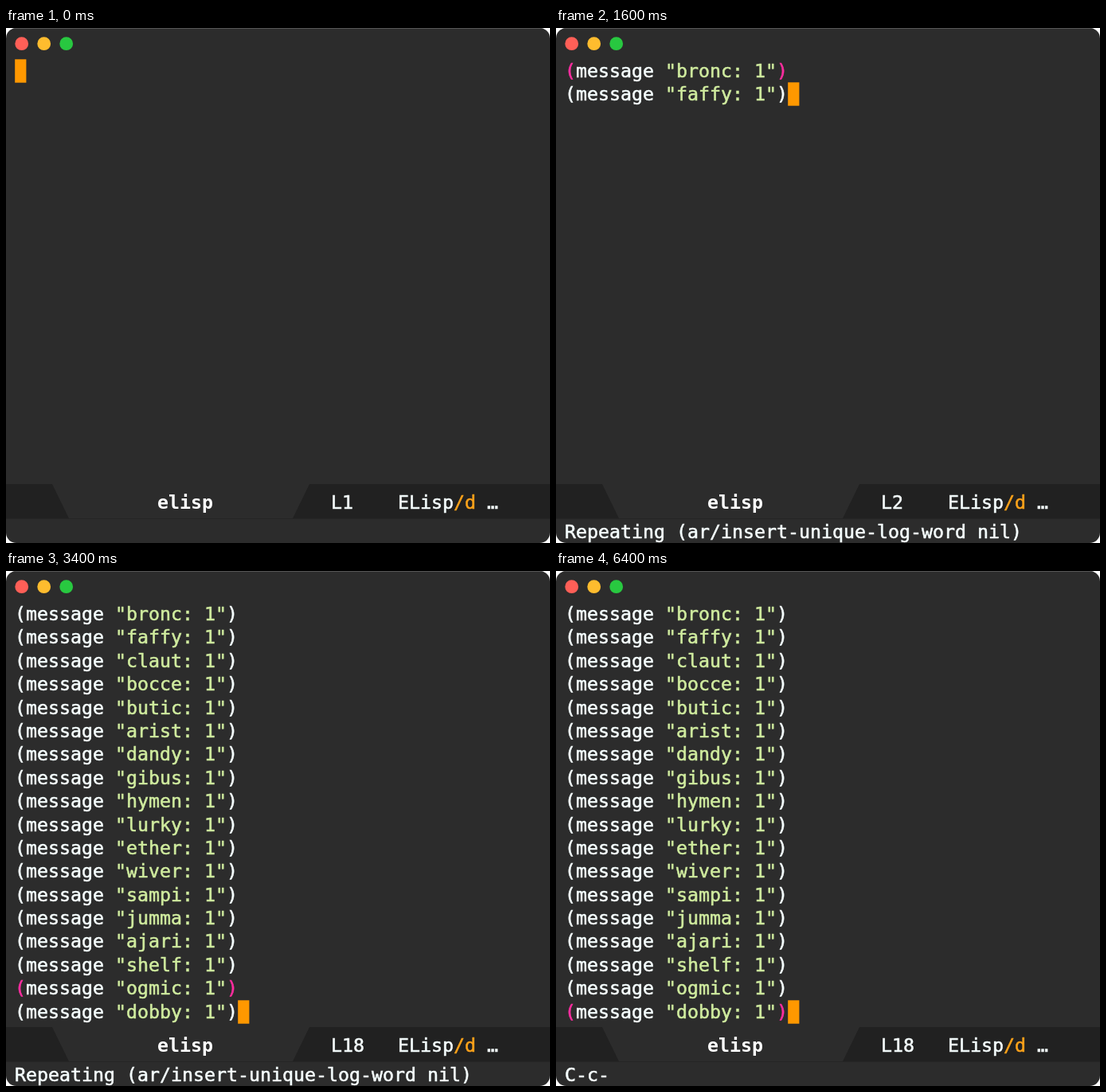
Write an HTML page with a canvas that moves like this. It is 683x647 px and loops after 6.7 s.

```html
<!DOCTYPE html>
<html lang="en">
<head>
<meta charset="utf-8">
<title>Editor log lines</title>
<style>
  html, body { margin: 0; width: 100%; height: 100%; overflow: hidden; background: #fff; }
  canvas { display: block; }
</style>
</head>
<body>
<canvas id="stage" width="683" height="647"></canvas>
<script>
const W = 683, H = 647, LOOP = 6700;
const CELL = 14, LEFT = 11, TOP = 39, ROW = 29.39;
const FONT = '23.254px "DejaVu Sans Mono", monospace';
const BG = '#2c2c2c', BAR = '#212121', TEXT = '#f6ffff';
const STRING = '#d0ec9f', PINK = '#ff2da0', ORANGE = '#ff9800';
const WORDS = ('bronc faffy claut bocce butic arist dandy gibus hymen ' +
  'lurky ether wiver sampi jumma ajari shelf ogmic dobby').split(' ');
const REPEAT = 'Repeating (ar/insert-unique-log-word nil)';
const ctx = document.getElementById('stage').getContext('2d');

// Value of the last [start, value] step reached at time t
const stepAt = (steps, t) => steps.filter(([start]) => start <= t).pop()[1];

function lineCount(t) {
  if (t >= 1900 && t < 2500) return 4 + 2 * Math.floor((t - 1900) / 100);
  return stepAt([[0, 0], [700, 1], [1600, 2], [2500, 14], [2600, 15],
    [2800, 16], [3000, 17], [3400, 18]], t);
}

const matchedRow = t => stepAt([[0, -1], [1000, 0], [3300, 16], [3700, 17]], t);

const echoText = t => stepAt([[0, ''],
  [200, 'Words not loaded: pick a new log word? (y or n)'],
  [700, ''], [1400, 'C-x-'], [1600, REPEAT], [6300, ''], [6400, 'C-c-']], t);

function cursorOn(t) {
  if (t < 3900) return t < 1200 || t >= 1600;
  return Math.floor((t - 3900) / 500) % 2 === 1;
}

// A thin outline gives regular text its medium weight
function write(text, x, y, color = TEXT, weight = '') {
  ctx.font = `${weight} ${FONT}`;
  ctx.fillStyle = ctx.strokeStyle = color;
  ctx.fillText(text, x, y);
  if (weight) return;
  ctx.lineWidth = .55;
  ctx.strokeText(text, x, y);
}

function fill(color, ...points) {
  ctx.fillStyle = color;
  ctx.beginPath();
  points.forEach(([x, y]) => ctx.lineTo(x, y));
  ctx.fill();
}

function drawWindow() {
  ctx.fillStyle = BG;
  ctx.fillRect(0, 0, W, H);
  ctx.fillStyle = '#565656';
  ctx.fillRect(0, 0, W, 1);
  ['#ff5f57', '#febc2e', '#28c840'].forEach((color, i) => {
    ctx.fillStyle = color;
    ctx.beginPath();
    ctx.arc(19.7 + 28 * i, 19.7, 8.4, 0, 2 * Math.PI);
    ctx.fill();
  });
}

function drawLine(word, row, matched) {
  const y = 62 + row * ROW;
  const paren = matched ? PINK : TEXT;
  const at = col => LEFT + col * CELL;
  write('(', at(0), y, paren);
  write('message', at(1), y);
  write(`"${word}: 1"`, at(9), y, STRING);
  write(')', at(19), y, paren);
}

function drawCursor(t, lines) {
  const x = LEFT + (lines ? 20 * CELL : 0);
  const y = Math.round(TOP + Math.max(0, lines - 1) * ROW);
  if (t >= 200 && t < 700) {
    ctx.strokeStyle = ORANGE;
    ctx.lineWidth = 1;
    ctx.strokeRect(x + .5, y + .5, 13, 29);
  } else if (cursorOn(t)) {
    ctx.fillStyle = ORANGE;
    ctx.fillRect(x + .2, y + .3, CELL + .2, 29.4);
  }
}

function drawModeLine(lines) {
  fill(BAR, [0, 573], [58, 573], [79, 616], [0, 616]);
  fill(BAR, [381, 573], [W, 573], [W, 616], [360, 616]);
  ctx.fillStyle = '#252525';
  ctx.fillRect(0, 616, W, 1);
  write('elisp', 190, 603.5, '#fff', 'bold');
  write('L' + Math.max(1, lines), 408, 603.5);
  write('ELisp', 492, 603.5);
  write('/d', 562, 603.5, '#ffa31a');
  write('…', 604, 603.5);
}

function draw(t) {
  const lines = lineCount(t), match = matchedRow(t);
  ctx.clearRect(0, 0, W, H);
  ctx.save();
  ctx.beginPath();
  ctx.roundRect(0, 0, W, H, 13);
  ctx.clip();
  drawWindow();
  WORDS.slice(0, lines).forEach((word, row) => drawLine(word, row, row === match));
  drawCursor(t, lines);
  drawModeLine(lines);
  write(echoText(t), LEFT, 640.5);
  ctx.restore();
}

const start = performance.now();
function tick() {
  draw((performance.now() - start) % LOOP);
  requestAnimationFrame(tick);
}
tick();
</script>
</body>
</html>
```
